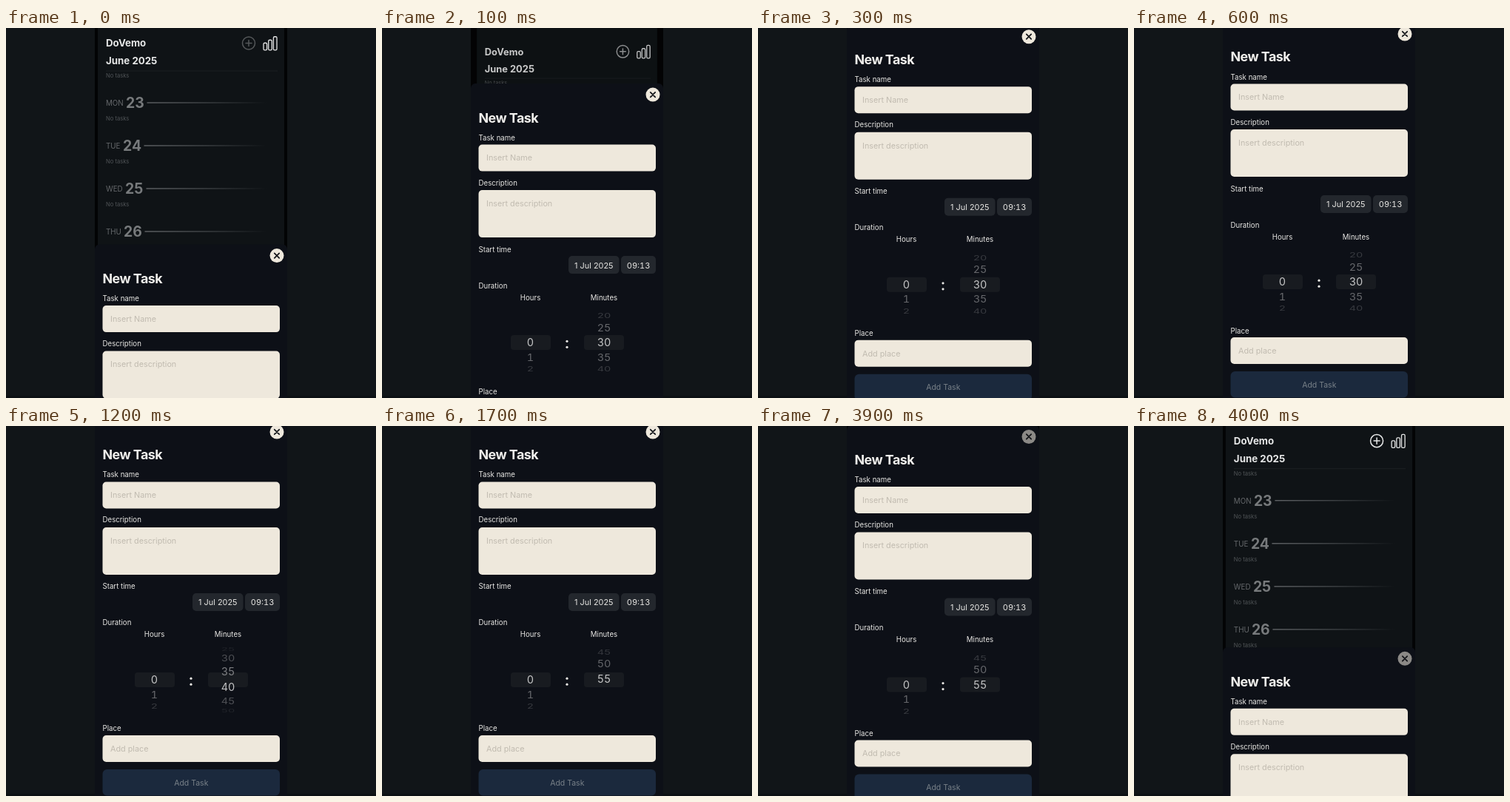
Recreate the animation shown at these times as an HTML page. Size 500 by 500 pixels, loop 4.1 s.

```html
<!DOCTYPE html>
<html lang="en">
<head>
<meta charset="utf-8">
<title>New task sheet</title>
<style>
  html, body { margin: 0; height: 100%; overflow: hidden; background: #111518; }
  svg { display: block; width: 100vw; height: 100vh; font-family: Inter, "Open Sans", sans-serif; }
  .mid { text-anchor: middle; }
  .tab { font-variant-numeric: tabular-nums; }
</style>
</head>
<body>
<svg viewBox="0 0 500 500">
  <defs>
    <linearGradient id="fade" gradientUnits="userSpaceOnUse" x1="185" x2="352">
      <stop stop-color="#626568"/>
      <stop offset=".5" stop-color="#3e4245"/>
      <stop offset="1" stop-color="#3e4245" stop-opacity="0"/>
    </linearGradient>
    <clipPath id="screen"><rect x="120" width="260" height="500"/></clipPath>
  </defs>
  <rect y="497" width="500" height="3" fill="#0c1013"/>
  <g clip-path="url(#screen)">
    <rect x="120" width="260" height="500" fill="#030405"/>
    <g id="calendar"></g>
    <rect id="dim" x="120" width="260" height="500"/>
    <g id="sheet"></g>
  </g>
</svg>
<script>
const PERIOD = 4100, STEP = 100;
const $ = id => document.getElementById(id);

function add(parent, tag, attrs, content = '') {
  const el = document.createElementNS('http://www.w3.org/2000/svg', tag);
  for (const key in attrs) el.setAttribute(key, attrs[key]);
  el.textContent = content;
  return parent.appendChild(el);
}

// y is the middle of the capitals
const text = (parent, x, y, size, fill, content, attrs) =>
  add(parent, 'text', { x, y: y + size * .36, 'font-size': size, fill, ...attrs }, content);

const box = (parent, x, y, width, height, fill, rx = 5) =>
  add(parent, 'rect', { x, y, width, height, rx, fill });

const line = (parent, d, stroke, width) =>
  add(parent, 'path', { d, stroke, 'stroke-width': width, fill: 'none', 'stroke-linecap': 'round' });

function buildCalendar(g) {
  const white = '#e6e7e7', bold = { 'font-weight': 700 };
  box(g, 124, -60, 252, 600, '#0f1316', 0);
  text(g, 135, 20.7, 13.3, white, 'DoVemo', bold);
  text(g, 135, 44.7, 13.3, white, 'June 2025', bold);
  box(g, 135, 57.5, 232, 1, '#1c2023', 0);

  const plus = add(g, 'g', {});
  add(plus, 'circle', { cx: 328, cy: 20.5, r: 8.5, fill: 'none', stroke: white, 'stroke-width': 1.5 });
  line(plus, 'M324 20.5h8M328 16.5v8', white, 1.5);
  [9.5, 13.5, 18].forEach((h, i) => {
    const bar = box(g, 348 + i * 6.7, 29.8 - h, 4.6, h, 'none', 1.6);
    bar.setAttribute('stroke', white);
    bar.setAttribute('stroke-width', 1.3);
  });

  text(g, 135, 64.5, 7.6, '#505457', 'No tasks');
  [['MON', 162], ['TUE', 158], ['WED', 161], ['THU', 159]].forEach(([day, x], i) => {
    const y = 101.3 + i * 58;
    text(g, 135, y, 9.8, '#66696c', day);
    text(g, x, y, 19.4, '#777a7c', 23 + i, bold);
    box(g, x + 28.5, y - 1, 352 - x - 28.5, 1.4, 'url(#fade)', 0);
    text(g, 135, y + 21.4, 7.6, '#505457', 'No tasks');
  });
  return plus;
}

function buildSheet(g) {
  const cream = '#eee8dc', ink = '#e8e7e4', hint = '#c1bbb0';
  const label = (x, y, content, attrs) => text(g, x, y, 9.7, ink, content, attrs);
  const field = (y, height, hintText) => {
    box(g, 130.5, y, 239.5, height, cream);
    text(g, 141, y + 18, 10.8, hint, hintText);
  };
  const mid = { class: 'mid' }, midTab = { class: 'mid tab' };

  box(g, 120, -7, 260, 700, '#0d1017', 6);
  const close = add(g, 'circle', { cx: 366, cy: 8, r: 9.5, fill: cream });
  line(g, 'M362.8 4.8l6.4 6.4m0-6.4l-6.4 6.4', '#14161a', 1.8);
  text(g, 130.5, 39, 17.9, '#f0efec', 'New Task', { 'font-weight': 700, 'letter-spacing': '-.03em' });
  label(130.5, 66, 'Task name');
  field(75.5, 36, 'Insert Name');
  label(130.5, 127, 'Description');
  field(137, 64, 'Insert description');
  label(130.5, 217, 'Start time');
  box(g, 252, 226, 68.5, 24, '#23272d');
  text(g, 286.3, 238.5, 10.9, ink, '1 Jul 2025', mid);
  box(g, 323, 226, 47, 24, '#23272d');
  text(g, 346.6, 238.5, 11, ink, '09:13', midTab);
  label(130.5, 266, 'Duration');
  label(200.5, 282, 'Hours', mid);
  label(300, 282, 'Minutes', mid);
  box(g, 174, 333, 54, 20, '#181b20', 4);
  box(g, 273, 333, 54, 20, '#181b20', 4);
  for (const cy of [341.2, 349.2]) add(g, 'circle', { cx: 250, cy, r: 1.6, fill: ink });

  const wheel = (x, values) => values.map(v => text(g, x, 0, 14.4, '#e0e0e0', v, midTab));
  const hours = wheel(200.5, [0, 1, 2, 3]);
  const minutes = wheel(300, Array.from({ length: 12 }, (_, i) => i * 5));

  label(130.5, 409, 'Place');
  field(418, 36, 'Add place');
  box(g, 130.5, 464, 239.5, 35.5, '#1b293d', 6);
  text(g, 250.3, 482, 10.5, '#788088', 'Add Task', mid);
  return { close, hours, minutes };
}

// Rows sit on a cylinder seen from the front
function turnWheel(rows, position) {
  rows.forEach((row, i) => {
    const k = i - position, far = Math.abs(k), angle = k * .45;
    row.setAttribute('opacity', far > 2.6 ? 0 : far < .5 ? .86 : Math.max(.06, .64 - .22 * far));
    row.setAttribute('transform',
      `translate(0 ${343 + 46 * Math.sin(angle)}) scale(1 ${Math.max(0, Math.cos(angle))})`);
  });
}

// Remaining distance of a critically damped spring, 1 to 0
function spring(ms) {
  const x = .0187 * Math.max(0, ms);
  return (1 + x) * Math.exp(-x);
}

// Flick from 30 past the last row, then a rubber-band return
function minutePosition(t) {
  if (t <= 1000) return 6;
  if (t < 1550) return 6 + 2.6 * (1 - Math.cos(Math.PI * (t - 1000) / 550));
  return t < 1900 ? 11 + .2 * Math.exp((1550 - t) / 125) : 11;
}

const plus = buildCalendar($('calendar'));
const { close, hours, minutes } = buildSheet($('sheet'));
turnWheel(hours, 0);

function draw(now) {
  const t = Math.floor(now % PERIOD / STEP) * STEP;
  const closing = t >= 3900;
  const open = closing ? spring(t - 3891) : 1 - spring(t + 75);
  const q = open - .41;
  $('sheet').setAttribute('transform', `translate(0 ${507 * (1 - open)})`);
  $('calendar').setAttribute('transform',
    `translate(250 ${28 * q}) scale(${1 - .077 * q}) translate(-250 0)`);
  $('dim').setAttribute('opacity', Math.max(0, .3 * q));
  plus.setAttribute('opacity', Math.min(1, .32 + t * .0036));
  close.setAttribute('fill', closing ? '#8b8986' : '#eee8dc');
  turnWheel(minutes, minutePosition(t));
  requestAnimationFrame(draw);
}
draw(performance.now());
</script>
</body>
</html>
```
